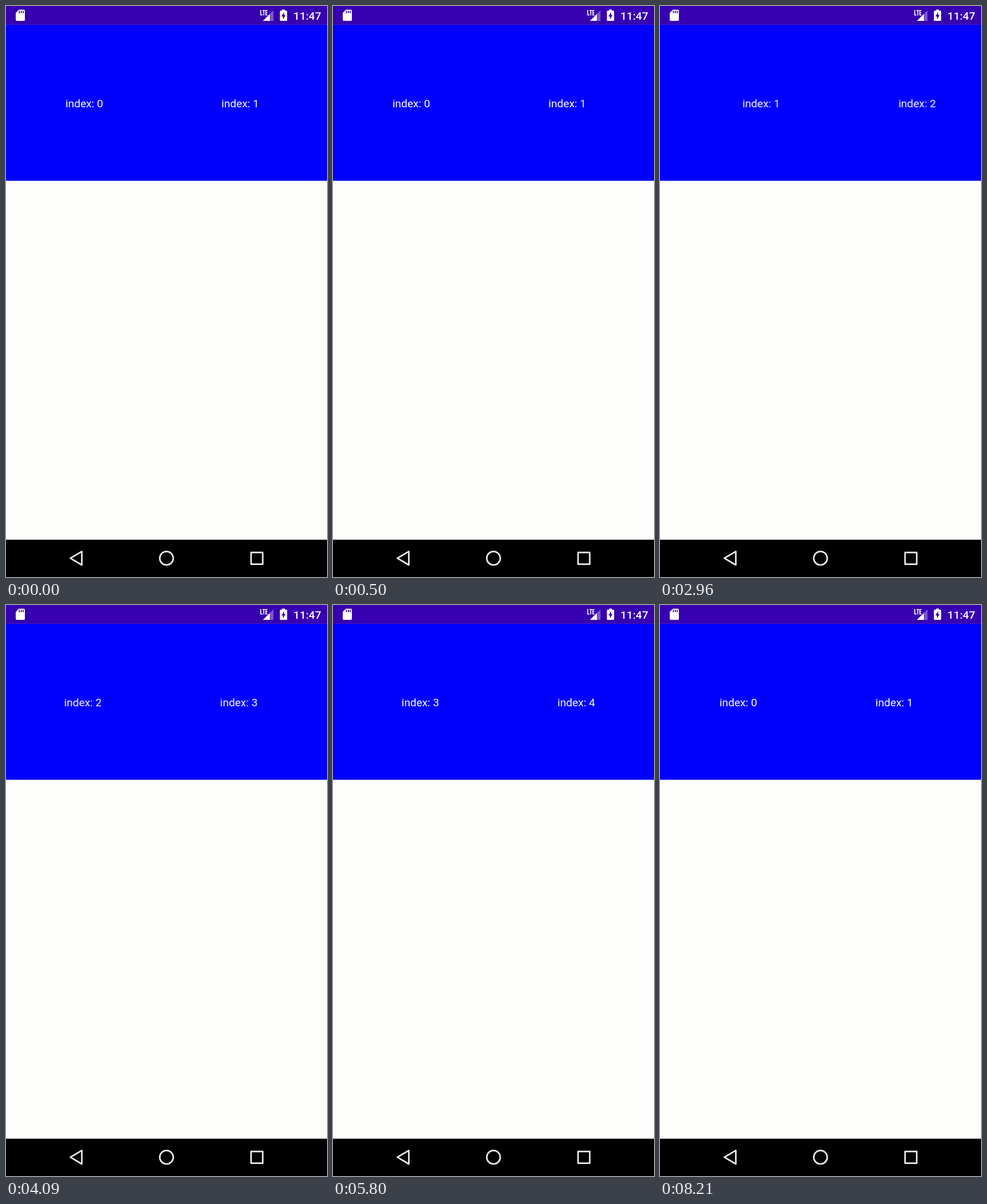
An HTML page that plays this animation: 561x998 px, repeating every 8250 ms.

```html
<!DOCTYPE html>
<html lang="en">
<head>
<meta charset="utf-8">
<title>Horizontal list</title>
<style>
  html, body { margin: 0; width: 100%; height: 100%; overflow: hidden; background: #fdfdfc; }
  svg { display: block; }
  text { font-family: Roboto, sans-serif; font-size: 19.1px; fill: #fff; }
  .clock { font-weight: 500; text-anchor: end; }
  #list text { text-anchor: middle; }
  #list { will-change: transform; }
</style>
</head>
<body>
<svg width="561" height="998" viewBox="0 0 561 998">
  <rect width="561" height="998" fill="#fdfdfc"/>
  <rect y="32.5" width="561" height="273" fill="#00f"/>
  <g id="list"></g>

  <!-- status bar -->
  <rect width="561" height="32.8" fill="#3700b0"/>
  <path fill="#fff" d="M22.5 6.5H31a2 2 0 0 1 2 2V24a2 2 0 0 1-2 2H19a2 2 0 0 1-2-2V12z"/>
  <path stroke="#3700b0" stroke-width="1.8" d="M23.4 8.5v4M26.8 8.5v4M30.2 8.5v4"/>
  <path fill="none" stroke="#fff" stroke-width="1.6"
        d="M445.2 7v8.6h3M448.2 7.8h4.6M450.5 7.8v8.6M457 7.8h-2.8v7.8h2.8M454.2 11.7h2.5"/>
  <path fill="#fff" d="M449 26l12-12v12z"/>
  <path fill="#fff" opacity=".35" d="M461 14l6.5-6.5V26H461z"/>
  <path fill="#fff" d="M482.5 6.2h5v2h2.6a1.2 1.2 0 0 1 1.2 1.2v15.4a1.2 1.2 0 0 1-1.2 1.2h-10.2a1.2 1.2 0 0 1-1.2-1.2V9.4a1.2 1.2 0 0 1 1.2-1.2h2.6z"/>
  <path fill="#3700b0" d="M486 10.8v5h2.6l-4.6 7.6v-5.2h-2.6z"/>
  <text class="clock" x="550.8" y="24">11:47</text>

  <!-- navigation bar -->
  <rect y="932.8" width="561" height="65.2" fill="#000"/>
  <g fill="none" stroke="#ececec" stroke-width="2.7" stroke-linejoin="round">
    <path d="M112.5 965.2l20-11.8v23.6z"/>
    <circle cx="280.5" cy="965.2" r="11.8"/>
    <rect x="428.3" y="955.2" width="20.4" height="20.4"/>
  </g>
</svg>
<script>
const LOOP = 8250, ITEM = 272.6, COUNT = 5;
const END = ITEM * COUNT - 561;
const list = document.getElementById('list');

for (let i = 0; i < COUNT; i++) {
  const label = document.createElementNS('http://www.w3.org/2000/svg', 'text');
  label.setAttribute('x', 136.8 + i * ITEM);
  label.setAttribute('y', 176.8);
  label.textContent = 'index: ' + i;
  list.append(label);
}

const drag = 'cubic-bezier(.5, 0, .7, .8)';
const settle = 'cubic-bezier(.2, .6, .4, 1)';
const swipe = 'cubic-bezier(.4, .1, .3, 1)';

// [time, scroll offset, easing towards the next step]
const steps = [
  [0, 0],
  [2670, 0, drag],
  [2960, 231.8, settle],
  [3120, ITEM],
  [3870, ITEM, swipe],
  [4090, 547.7, settle],
  [4240, ITEM * 2],
  [4680, ITEM * 2, swipe],
  [4980, END],
  [6130, END, swipe],
  [6480, ITEM * 2],
  [6560, ITEM * 2, swipe],
  [6910, ITEM],
  [7060, ITEM, swipe],
  [7420, 0],
  [LOOP, 0]
];

list.animate(
  steps.map(([time, scroll, easing = 'linear']) => ({
    offset: time / LOOP,
    transform: `translateX(${-scroll}px)`,
    easing
  })),
  { duration: LOOP, iterations: Infinity }
);
</script>
</body>
</html>
```
